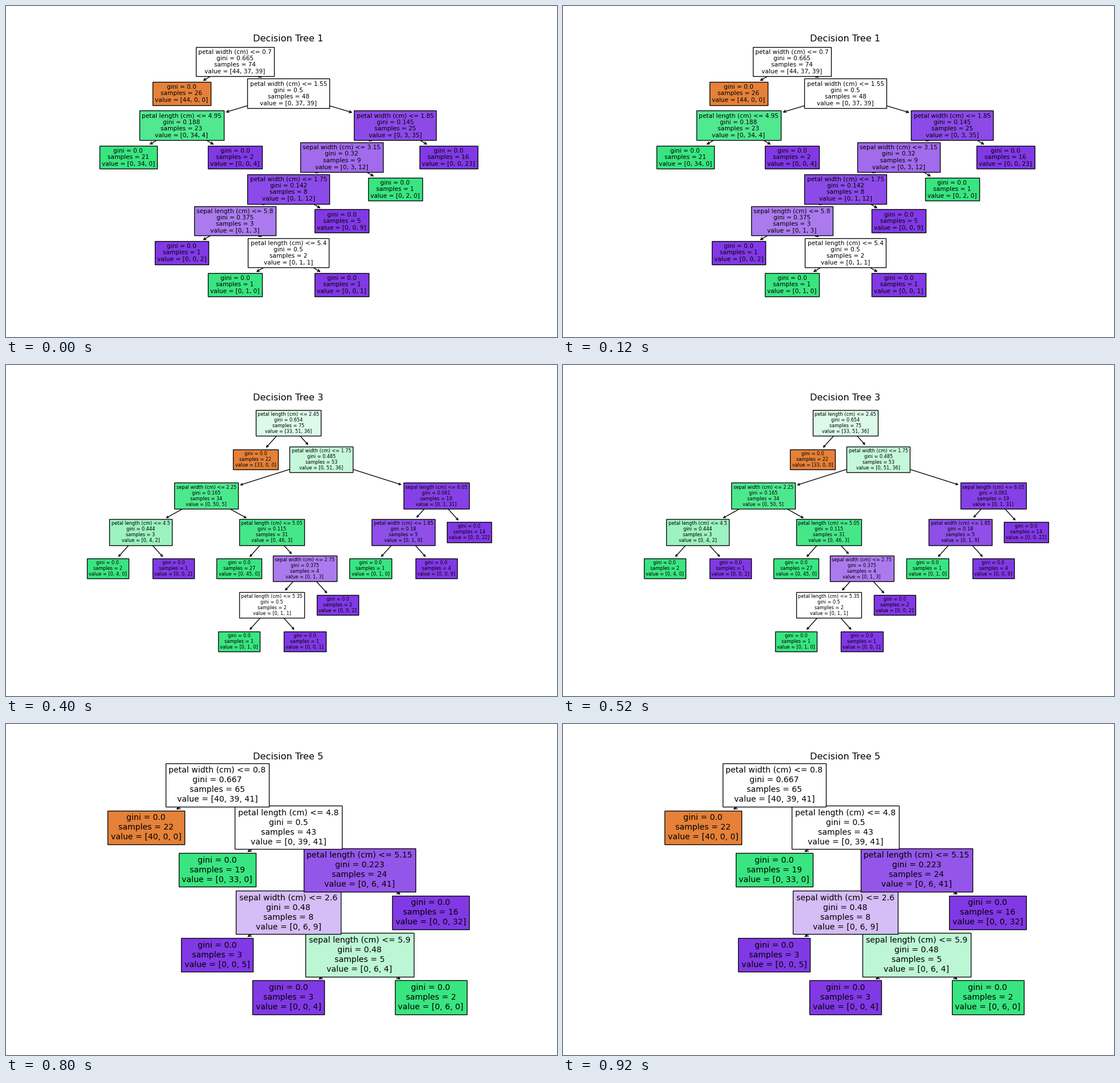
Animation of 966 by 580 pixels, one loop 1000 ms. Source, as a matplotlib script:

```python
import colorsys
from itertools import zip_longest

import matplotlib.pyplot as plt
import numpy as np
from matplotlib.animation import FuncAnimation

W, H, DPI = 966, 580, 96
SHRINK = W / 1000          # text is laid out on a 1000 px stage, then scaled
DRAWS = 120                # rows drawn, with repeats, to grow each tree
HUES = [(25 + 120 * k) / 360 for k in range(3)]


class Node:
    """Tree node with its label, fill and tidy-tree outline per level."""

    def __init__(self, value, samples, test="", children=()):
        self.value, self.samples, self.children = value, samples, children
        share = value / value.sum()
        gini = round(float(1 - (share ** 2).sum()), 3)
        self.label = (f"{test}gini = {gini}\nsamples = {samples}\n"
                      f"value = {value.tolist()}")
        self.fill = blend(share)
        self.half, self.reach = 0, [(0, 0)]
        if children:
            self.spread()

    def spread(self):
        """Push the two subtrees apart until no level is closer than 1."""
        left, right = (c.reach for c in self.children)
        self.half = max(a[1] - b[0] + 1 for a, b in zip(left, right)) / 2
        for a, b in zip_longest(left, right):
            low = a[0] - self.half if a else b[0] + self.half
            high = b[1] + self.half if b else a[1] - self.half
            self.reach.append((low, high))


def blend(share):
    """Hue of the top class, whiter the closer the runner-up; ties are white."""
    second, first = sorted(share)[-2:]
    alpha = (first - second) / (1 - second)
    if alpha < 0.1:
        return "white"
    base = np.array(colorsys.hsv_to_rgb(HUES[np.argmax(share)], 0.75, 0.9))
    return tuple(alpha * base + 1 - alpha)


def leaf(kind, count, unique=None):
    """Pure node; about 0.61 of the drawn rows are distinct unless given."""
    unique = unique or max(1, round(0.61 * count))
    return Node(count * np.eye(3, dtype=int)[kind], unique)


def green(count, unique=None):
    return leaf(1, count, unique)


def violet(count, unique=None):
    return leaf(2, count, unique)


def split(feature, threshold, left, right):
    return Node(left.value + right.value, left.samples + right.samples,
                f"{feature} (cm) <= {threshold}\n", (left, right))


def tree(feature, threshold, rest, unique=None):
    """The first split always sets the whole orange class apart."""
    orange = leaf(0, DRAWS - int(rest.value.sum()), unique)
    return split(feature, threshold, orange, rest)


PL, PW = "petal length", "petal width"
SL, SW = "sepal length", "sepal width"

forest = [
    tree(PW, 0.7, split(
        PW, 1.55,
        split(PL, 4.95, green(34), violet(4)),
        split(PW, 1.85,
              split(SW, 3.15,
                    split(PW, 1.75,
                          split(SL, 5.8, violet(2),
                                split(PL, 5.4, green(1), violet(1))),
                          violet(9)),
                    green(2)),
              violet(23, 16))), 26),
    tree(PL, 2.6, split(
        PL, 4.95,
        split(SL, 4.95,
              split(PW, 1.35, green(3, 1), violet(2)), green(33, 21)),
        split(PL, 5.05,
              split(SL, 6.5, violet(2, 2), green(1)), violet(36, 23)))),
    tree(PL, 2.45, split(
        PW, 1.75,
        split(SW, 2.25,
              split(PL, 4.5, green(4), violet(2)),
              split(PL, 5.05, green(45),
                    split(SW, 2.75,
                          split(PL, 5.35, green(1), violet(1)),
                          violet(2, 2)))),
        split(SL, 6.05,
              split(PW, 1.85, green(1), violet(9, 4)), violet(22, 14))), 22),
    tree(PL, 2.45, split(
        SL, 6.05,
        split(PL, 4.7, green(28), split(PW, 1.7, green(4, 1), violet(6))),
        split(SW, 2.85, violet(9),
              split(SW, 3.15,
                    split(PL, 5.1, green(8, 7), violet(10, 7)),
                    split(PL, 5.0, green(2), violet(10))))), 29),
    tree(PW, 0.8, split(
        PL, 4.8, green(33, 19),
        split(PL, 5.15,
              split(SW, 2.6, violet(5),
                    split(SL, 5.9, violet(4, 3), green(6, 2))),
              violet(32, 16))), 22),
]

fig = plt.figure(figsize=(W / DPI, H / DPI), dpi=DPI, facecolor="white")
ax = fig.add_axes([0.125, 0.11, 0.775, 0.77])


def text_height(text, size, spacing):
    probe = fig.text(0, 0, text, fontsize=size, linespacing=spacing)
    height = probe.get_window_extent().height
    probe.remove()
    return height


def fitted_spacing(text, size):
    """Line spacing that keeps the block height of the full-size layout."""
    goal = SHRINK * text_height(text, size / SHRINK, 1.2)
    single, double = (text_height(text, size, s) for s in (1, 2))
    return 1 + (goal - single) / (double - single)


def draw_node(node, x, depth, place, style, parent=None):
    spot = place(x, depth)
    arrow = dict(arrowstyle="<-", edgecolor="black") if parent else None
    ax.annotate(node.label, parent or spot, spot,
                xycoords="axes fraction", textcoords="axes fraction",
                ha="center", va="center", zorder=100 - 10 * depth,
                bbox=dict(boxstyle="square,pad=0.4", fc=node.fill,
                          ec="black", lw=1),
                arrowprops=arrow, **style)
    for child, side in zip(node.children, (-1, 1)):
        draw_node(child, x + side * node.half, depth + 1, place, style, spot)


def update(i):
    ax.clear()
    ax.set_axis_off()
    ax.set_title(f"Decision Tree {i + 1}", fontsize=12.08)

    root = forest[i]
    left = min(low for low, _ in root.reach)
    cols = max(high for _, high in root.reach) - left + 1
    rows = len(root.reach)

    def place(x, depth):
        return (x - left + 0.5) / cols, 1 - (depth + 0.5) / rows

    # Largest text whose boxes still fit one grid cell.
    em = min(0.1885 * 0.77 * H / rows, 0.775 * W / cols / 14.13)
    size = em * 72 / DPI
    style = dict(fontsize=size, linespacing=fitted_spacing(root.label, size))
    draw_node(root, 0, 0, place, style)
    return []


anim = FuncAnimation(fig, update, frames=len(forest), interval=200,
                     init_func=lambda: update(0), repeat=True, repeat_delay=0)
plt.show()
```
